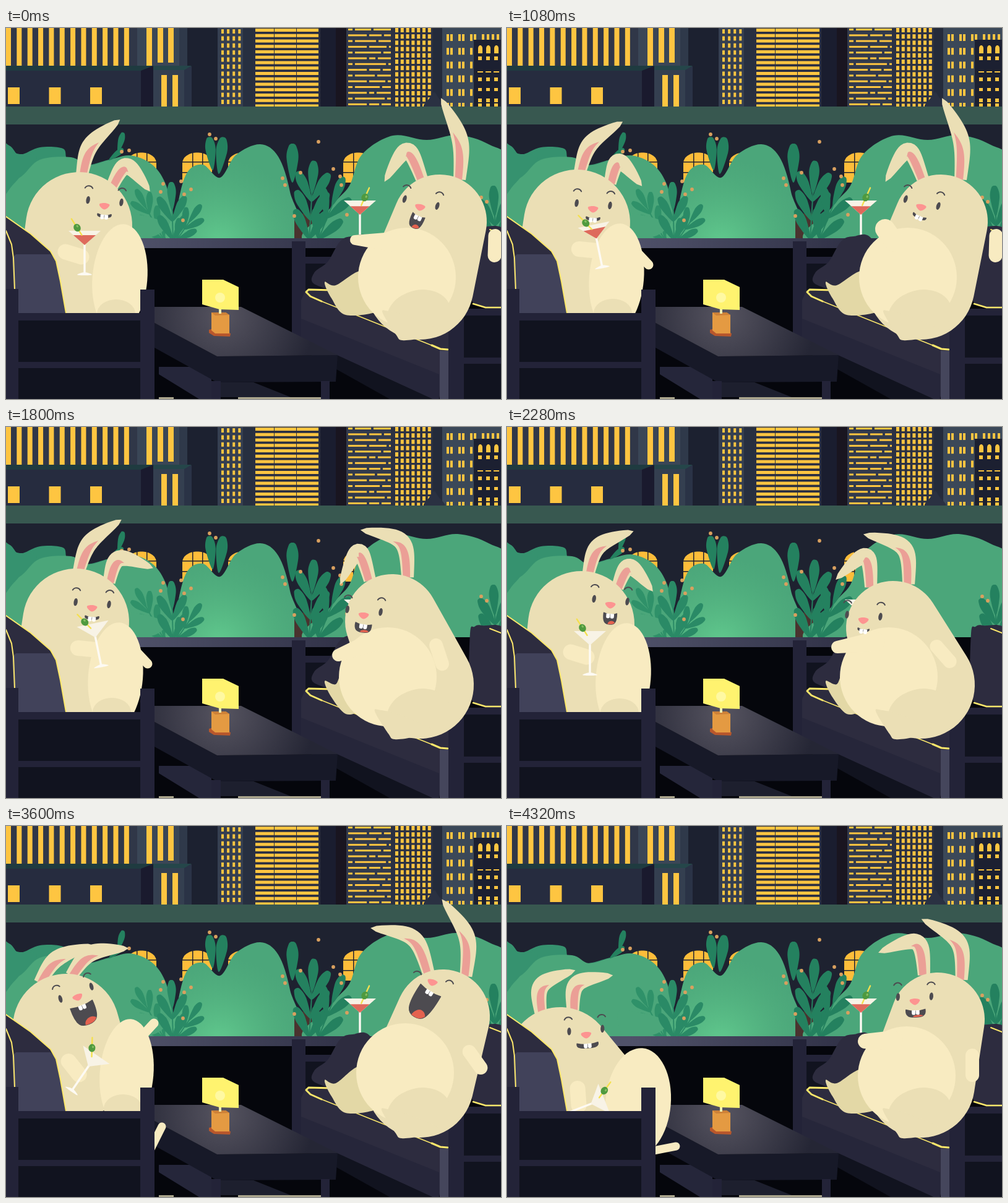
Write an HTML page with a canvas that moves like this. It is 800 px wide and 600 px high and loops after 4400 ms.

```html
<!DOCTYPE html>
<html lang="en">
<head>
<meta charset="utf-8">
<title>Rooftop drinks</title>
<style>
html, body { margin: 0; width: 100%; height: 100%; overflow: hidden; background: #05060c; }
canvas { display: block; width: 800px; height: 600px; }
</style>
</head>
<body>
<canvas id="stage" width="800" height="600"></canvas>
<script>
const LOOP = 4400, STEP = 40, RAD = Math.PI / 180;
const FUR = '#ebdfb5', BELLY = '#f8ebc1', FAR = '#e3d8a6', PINK = '#eb9f96', DARK = '#4d4b50';
const GOLD = '#fec541', PIPE = '#fbe76b', WOOD = '#232338', PANEL = '#11131f', SEAT = '#2d2c3f';
const BUSH = '#4ba67a', SHADE = '#36926f', LEAF = '#24815f', NIGHT = '#1e2230';
const stage = document.getElementById('stage').getContext('2d');
let c = stage;

// ---- drawing helpers
function rect(col, x, y, w, h) { c.fillStyle = col; c.fillRect(x, y, w, h); }
function trace(p) {
  c.beginPath();
  for (let i = 0; i < p.length; i += 2) c.lineTo(p[i], p[i + 1]);
}
function poly(col, p) { trace(p); c.closePath(); c.fillStyle = col; c.fill(); }
function line(col, w, p) {
  trace(p);
  c.strokeStyle = col; c.lineWidth = w; c.lineCap = c.lineJoin = 'round';
  c.stroke();
}
function oval(col, x, y, rx, ry, a = 0) {
  c.beginPath(); c.ellipse(x, y, rx, ry, a, 0, 7); c.fillStyle = col; c.fill();
}
// closed smooth curve through the points
function blob(col, p) {
  const n = p.length / 2, at = i => [p[((i + n) % n) * 2], p[((i + n) % n) * 2 + 1]];
  c.beginPath(); c.moveTo(p[0], p[1]);
  for (let i = 0; i < n; i++) {
    const [a, b, d, e] = [at(i - 1), at(i), at(i + 1), at(i + 2)];
    c.bezierCurveTo(b[0] + (d[0] - a[0]) / 6, b[1] + (d[1] - a[1]) / 6,
      d[0] - (e[0] - b[0]) / 6, d[1] - (e[1] - b[1]) / 6, d[0], d[1]);
  }
  c.fillStyle = col; c.fill();
}
// two circles joined by their outer tangents
function hull(col, x0, y0, r0, x1, y1, r1) {
  const a = Math.atan2(y1 - y0, x1 - x0), d = Math.hypot(x1 - x0, y1 - y0);
  const b = Math.acos(Math.max(-1, Math.min(1, (r0 - r1) / (d || 1))));
  c.beginPath();
  c.arc(x0, y0, r0, a + b, a - b + 2 * Math.PI);
  c.arc(x1, y1, r1, a - b, a + b);
  c.closePath(); c.fillStyle = col; c.fill();
}
function placed(x, y, turn, draw) { c.save(); c.translate(x, y); c.rotate(turn); draw(); c.restore(); }
function fill(g, a, b) { g.addColorStop(0, a); g.addColorStop(1, b); return g; }
const fade = (x0, y0, x1, y1, a, b) => fill(c.createLinearGradient(x0, y0, x1, y1), a, b);
const glow = (x, y, r, a, b) => fill(c.createRadialGradient(x, y, 0, x, y, r), a, b);
function grid(x, y, w, h, dx, dy, nx, ny) {
  for (let i = 0; i < nx; i++) for (let j = 0; j < ny; j++) rect(GOLD, x + i * dx, y + j * dy, w, h);
}

// ---- scenery
function city() {
  rect('#1c2130', 0, 0, 800, 127);
  rect('#303748', 0, 0, 212, 62);
  rect('#3a4656', 212, 0, 68, 62);
  rect('#2f394a', 280, 0, 13, 62);
  grid(0, 0, 8, 61, 17.35, 1, 12, 1);
  rect(GOLD, 227, 0, 9, 61);
  grid(245, 0, 9, 56, 17, 1, 2, 1);
  rect('#262c3f', 0, 69, 218, 58);
  poly('#1a1a2e', [218, 69, 238, 61, 238, 127, 218, 127]);
  poly('#1f3b40', [0, 61, 238, 61, 218, 69, 0, 69]);
  grid(3, 96, 19, 27, 66.5, 1, 3, 1);
  rect('#343f50', 238, 66, 50, 61);
  rect('#2a3346', 288, 62, 12, 65);
  poly('#25464a', [238, 61, 300, 61, 288, 68, 238, 68]);
  grid(251, 76, 9, 51, 18, 1, 2, 1);
  rect('#353f51', 342, 0, 41, 127);
  rect('#272f40', 383, 0, 17, 127);
  grid(348, 2, 4, 7, 9.1, 11.4, 4, 11);
  rect('#2a2f42', 400, 0, 108, 127);
  grid(403, 1, 30, 5, 36, 8.75, 1, 15);
  grid(434, 1, 35, 5, 36, 8.75, 2, 15);
  rect('#1a1d2f', 508, 0, 25, 127);
  rect('#191520', 533, 0, 17, 127);
  rect('#323a4c', 550, 0, 72, 127);
  for (let i = 0; i < 14; i++) {
    rect(GOLD, 553, 1 + i * 9.3, 69, 3);
    rect('#323a4c', 560 + i * 23 % 46, i * 9.3, 4, 5);
    rect('#323a4c', 590 + i * 17 % 26, i * 9.3, 4, 5);
  }
  rect('#2b3143', 622, 0, 68, 127);
  grid(629, 0, 5, 7, 8.8, 10.2, 7, 13);
  rect('#242b3b', 690, 0, 15, 127);
  rect('#3b4858', 705, 0, 95, 127);
  for (let x = 712; x < 760; x += 19) grid(x, 10, 4, 11, 6, 22.2, 2, 6);
  grid(769, 10, 4, 9, 8, 1, 4, 1);
  rect('#1c2031', 756, 19, 44, 108);
  for (let x = 763; x < 800; x += 13) {
    oval(GOLD, x + 3.5, 33, 3.5, 5);
    rect(GOLD, x, 33, 7, 8);
    rect(GOLD, x - 1, 70, 9, 2);
    grid(x, 46, 6, 6, 1, 34, 1, 3);
    grid(x, 97, 6, 5, 1, 25, 1, 2);
  }
  blob('#2a3142', [676, 128, 684, 114, 692, 104, 699, 113, 709, 128]);
  rect('#385850', 0, 127, 800, 29);
}
function arch(x) {
  c.beginPath();
  c.moveTo(x - 24, 250); c.lineTo(x - 24, 218);
  c.bezierCurveTo(x - 22, 196, x + 22, 196, x + 24, 218);
  c.lineTo(x + 24, 250); c.fillStyle = '#febd3a'; c.fill();
  for (const d of [-8, 8]) rect(NIGHT, x + d, 201, 1.5, 50);
  for (const y of [216, 233]) rect(NIGHT, x - 24, y, 49, 1.5);
}
function leaf(x, y, len, a, col = LEAF) {
  placed(x, y, a, () => blob(col, [0, 0, -len * .15, -len * .6, -len * .1, -len * .93, 0, -len, len * .1, -len * .93, len * .15, -len * .6]));
}
// a stem with pairs of leaves and one at the tip
function sprig(x, y, len, a, pairs, size, col) {
  const dx = Math.sin(a) * len, dy = -Math.cos(a) * len;
  line(col, 2, [x, y, x + dx, y + dy]);
  for (let i = 0; i < pairs; i++) {
    const k = i / pairs;
    for (const side of [-.5, .5]) leaf(x + dx * k, y + dy * k, size, a + side, col);
  }
  leaf(x + dx * .8, y + dy * .8, size, a, col);
}
function garden() {
  rect(NIGHT, 0, 156, 800, 186);
  [219, 309, 383, 569, 814].forEach(arch);
  blob(SHADE, [-20, 345, -30, 180, 5, 190, 22, 205, 55, 193, 92, 195, 100, 213, 130, 222, 190, 210, 235, 235, 250, 345]);
  blob(BUSH, [-20, 345, -15, 268, 25, 240, 55, 213, 105, 209, 132, 222, 165, 214, 200, 206, 235, 220, 257, 250, 270, 300, 274, 345]);
  blob(SHADE, [-5, 205, 22, 204, 50, 208, 30, 232, 10, 255, -5, 268]);
  leaf(166, 214, 30, .9); leaf(181, 202, 34, .25);
  sprig(256, 345, 75, -.5, 3, 36, '#2f9169');
  blob(BUSH, [180, 300, 215, 302, 250, 312, 256, 325, 235, 338, 190, 342]);
  leaf(334, 230, 54, -.1); leaf(344, 236, 60, .12);
  const mound = [271, 350, 277, 290, 292, 235, 318, 221, 346, 242, 372, 205, 411, 188, 440, 208, 459, 265, 468, 350];
  blob(BUSH, mound);
  blob(glow(345, 350, 140, 'rgba(112,226,156,.6)', 'rgba(90,190,130,0)'), mound);
  sprig(270, 343, 60, -.03, 2, 46, '#2a8a66');
  sprig(276, 343, 42, .6, 2, 36, '#2a8a66');
  rect('#4a332f', 466, 300, 42, 42);
  blob(BUSH, [495, 350, 525, 290, 555, 255, 575, 205, 625, 174, 680, 181, 730, 173, 780, 188, 815, 220, 815, 350]);
  leaf(463, 250, 63, 0);
  sprig(490, 342, 92, .06, 3, 54, LEAF);
  sprig(505, 342, 74, .38, 2, 50, LEAF);
  sprig(792, 345, 50, -.05, 2, 50, LEAF);
  const dots = [329, 172, 339, 179, 187, 200, 199, 198, 254, 252, 250, 265, 283, 248, 299, 261, 288, 269, 286, 311,
    447, 243, 451, 254, 476, 234, 505, 184, 529, 228, 540, 240, 542, 254, 466, 304, 551, 302, 768, 274, 777, 281];
  for (let i = 0; i < dots.length; i += 2) oval('#d9a05f', dots[i], dots[i + 1], 2.9, 2.9);
}
function terrace() {
  rect('#05060c', 0, 340, 800, 260);
  rect(fade(195, 0, 600, 0, '#50526a', '#2c2d42'), 100, 340, 500, 16);
  // far bench
  rect(PANEL, 484, 381, 70, 45);
  rect(WOOD, 484, 370, 60, 11);
  blob(SEAT, [500, 415, 498, 396, 520, 378, 540, 345, 560, 337, 590, 342, 620, 425, 560, 430]);
  rect(WOOD, 462, 345, 22, 160);
  poly(PANEL, [477, 490, 700, 590, 700, 600, 620, 600, 477, 520]);
  poly(SEAT, [484, 424, 560, 424, 716, 470, 716, 521, 700, 600, 690, 600, 477, 502, 477, 440]);
  poly('#26263a', [477, 470, 700, 560, 700, 600, 690, 600, 477, 502]);
  line(PIPE, 3, [528, 424, 489, 423, 485, 427, 492, 434, 510, 442]);
  line(PIPE, 1.5, [510, 442, 560, 462, 625, 488, 700, 518]);
  line(PIPE, 3, [688, 513, 702, 519, 714, 520]);
  rect('#45465c', 701, 522, 14, 78);
  blob(SEAT, [750, 334, 757, 323, 770, 321, 810, 334, 815, 452, 770, 452, 750, 430]);
  line(PIPE, 2, [782, 326, 800, 333]);
  line(PIPE, 2.5, [755, 446, 775, 452, 800, 452]);
  rect(PANEL, 740, 460, 60, 140);
  rect(WOOD, 715, 453, 25, 147);
  rect(WOOD, 740, 454, 60, 11);
  rect(WOOD, 740, 533, 60, 10);
  // table
  rect('#a9a48b', 247, 597, 24, 3);
  rect('#a9a48b', 375, 597, 134, 3);
  poly('#25263a', [247, 548, 300, 548, 332, 564, 332, 600, 312, 600, 247, 560]);
  poly('#1d1f2e', [347, 573, 400, 573, 460, 597, 347, 597]);
  poly('#171928', [240, 477, 341, 531, 536, 529, 533, 572, 341, 573, 240, 517]);
  poly(glow(350, 465, 150, '#565460', '#252635'), [240, 451, 380, 451, 536, 529, 341, 531, 240, 477]);
  rect(WOOD, 332, 571, 15, 29);
  rect(WOOD, 509, 571, 14, 29);
  // lamp
  poly('#b8572c', [328, 488, 340, 485, 363, 494, 362, 499, 336, 498, 328, 493]);
  poly('#e49a42', [332, 460, 355, 460, 361, 464, 361, 494, 338, 494, 332, 489]);
  poly('#cd8138', [332, 460, 338, 465, 361, 464, 355, 460]);
  rect('#eeeeb0', 344, 444, 4, 18);
  poly('#fff36f', [317, 407, 351, 407, 376, 419, 376, 456, 345, 455, 317, 447]);
  oval('#fff9a2', 346, 436, 8, 8);
}
function frontBench() {
  const edge = [0, 305, 40, 333, 72, 361, 81, 377, 88, 410, 97, 461];
  poly(SEAT, [...edge, 0, 461]);
  poly('#41425a', [10, 372, 16, 366, 72, 366, 80, 374, 97, 461, 14, 461]);
  line(PIPE, 2, edge);
  line(PIPE, 2, [0, 328, 9, 350, 12, 372, 14, 422]);
  rect(PANEL, 20, 473, 197, 127);
  rect(WOOD, 0, 422, 20, 178);
  rect(WOOD, 20, 461, 197, 12);
  rect(WOOD, 20, 540, 197, 10);
  rect(WOOD, 217, 423, 23, 177);
}

// ---- poses: each one states only what changes
// ears: degrees of lower and upper half, for both; nose: x, y, tilt; mouth: width, opening
const sit = {
  head: [118, 319], lean: 0, ears: [-80, -37, -64, 53], nose: [159, 288, .07], mouth: [22, 5],
  belly: [184, 405], cup: [127, 328, 0], paw: [205, 380], toe: [215, 490]
};
const sip = {
  ...sit, head: [113, 315], ears: [-76, -30, -77, 52], nose: [139, 293, .07],
  belly: [177, 404], cup: [140, 318, -.2], paw: [229, 383]
};
const drain = { ...sip, ears: [-75, -32, -78, 22] };
const chat = {
  ...sit, head: [120, 319], lean: .08, ears: [-78, -18, -70, 52], nose: [167, 288, .08], mouth: [21, 18],
  belly: [188, 405], cup: [134, 330, 0]
};
const giggle = {
  ...sit, head: [118, 322], lean: -.25, ears: [-67, -24, -57, 32], nose: [155, 287, -.17], mouth: [38, 24],
  belly: [194, 403], cup: [139, 343, .2], paw: [239, 336], toe: [238, 483]
};
const roar = {
  ...giggle, head: [97, 325], lean: -.6, ears: [-61, -16, -57, -3], nose: [116, 277, -.38], mouth: [38, 34],
  belly: [195, 400], cup: [146, 370, .6], paw: [239, 319], toe: [252, 486]
};
const slump = {
  ...roar, head: [86, 379], lean: -.45, ears: [-98, -18, -91, -7], nose: [128, 338, -.08], mouth: [34, 8],
  belly: [212, 447], cup: [157, 441, 1.2], paw: [205, 410], toe: [273, 518]
};
const point = {
  head: [701, 313], lean: 0, ears: [-110, -240, -85, -118], nose: [669, 290, .21], mouth: [21, 22], shut: 0,
  belly: [648, 403], hand: [564, 343, 8], paw: [790, 352, 1.6]
};
const rest = { ...point, mouth: [22, 5], hand: [611, 325, 16] };
const bend = {
  ...point, head: [624, 314], lean: -.1, ears: [-105, -246, -91, -171], nose: [578, 305, .08], mouth: [26, 14],
  belly: [617, 404], hand: [537, 369, 10], paw: [700, 368, 1.25]
};
const wave = {
  ...bend, head: [624, 325], ears: [-92, -224, -89, -168], nose: [576, 313, .06], mouth: [18, 4],
  hand: [534, 356, 10], paw: [705, 367, .85]
};
const shout = {
  ...bend, head: [648, 290], ears: [-96, -218, -86, -169], nose: [611, 272, 0], mouth: [57, 20],
  belly: [618, 398], hand: [563, 346, 12], paw: [680, 355, -.75]
};
const laugh = {
  ...point, head: [706, 308], lean: .08, ears: [-106, -173, -83, -128], nose: [689, 253, .28], mouth: [38, 50], shut: 1,
  belly: [645, 399], hand: [625, 360, 9], paw: [758, 378, .95]
};
const calm = {
  ...point, head: [696, 313], lean: .1, ears: [-93, -202, -87, -154], nose: [659, 284, -.02], mouth: [31, 12],
  belly: [646, 404], hand: [579, 348, 12], paw: [752, 387, 1.57]
};
// pose, time it is reached, time it is left
const leftPlan = [[sit, 0, 480], [sip, 960, 1240], [drain, 1720, 1840], [chat, 2200, 2860],
  [giggle, 3060, 3160], [roar, 3480, 3680], [slump, 4200, LOOP]];
const rightPlan = [[point, 0, 560], [rest, 920, 1280], [bend, 1700, 1840], [wave, 2200, 2380],
  [shout, 2760, 3080], [laugh, 3440, 3760], [calm, 4280, LOOP]];

function poseAt(plan, t) {
  const i = plan.findLastIndex(row => row[1] <= t), [a, , leave] = plan[i];
  const [b, reach] = plan[i + 1] || [a, LOOP + 1];
  const u = Math.max(0, (t - leave) / (reach - leave)), k = u * u * (3 - 2 * u);
  const mix = (v, w) => Array.isArray(v) ? v.map((n, j) => mix(n, w[j])) : v + (w - v) * k;
  return Object.fromEntries(Object.keys(a).map(key => [key, mix(a[key], b[key])]));
}

// ---- rabbit parts
// pull gives the fold of the ear, side the half that shows its inside
function ear(x0, y0, low, high, len0, len1, side) {
  const bx = x0 + Math.cos(low * RAD) * len0, by = y0 + Math.sin(low * RAD) * len0;
  const x1 = bx + Math.cos(high * RAD) * len1, y1 = by + Math.sin(high * RAD) * len1;
  const at = (s, f) => {
    const r = 1 - s, k0 = r ** 3, k1 = s ** 3, kb = 3 * r * s;
    const dx = r * r * (bx - x0) + s * s * (x1 - bx), dy = r * r * (by - y0) + s * s * (y1 - by), d = Math.hypot(dx, dy);
    const w = f * (10 + 3.5 * Math.sin(Math.PI * s)) * Math.sqrt(1 - s ** 5);
    return [k0 * x0 + kb * bx + k1 * x1 - dy / d * w, k0 * y0 + kb * by + k1 * y1 + dx / d * w];
  };
  const band = (col, end, f, g) => {
    const p = [], q = [];
    for (let i = 0; i <= 24; i++) {
      p.push(...at(i / 24 * end, f(i / 24)));
      q.unshift(...at(i / 24 * end, g(i / 24)));
    }
    poly(col, p.concat(q));
  };
  band(FUR, 1, () => -1, () => 1);
  band(PINK, .64, u => side * (.75 - .15 * u), u => side * (-.4 + u ** 2));
}
function ears({ head: [x, y], lean, ears: e }, r, spots, len0, len1, side) {
  spots.map((spot, i) => ear(x + Math.cos(lean + spot) * r, y + Math.sin(lean + spot) * r, e[i * 2], e[i * 2 + 1], len0, len1, side));
}
function face({ nose: [x, y, tilt], mouth: [w, h], shut = 0 }, mouthTurn) {
  const brow = y => {
    c.beginPath(); c.arc(0, y, 7, 1.15 * Math.PI, 1.85 * Math.PI);
    c.strokeStyle = DARK; c.lineWidth = 2; c.lineCap = 'round'; c.stroke();
  };
  placed(x, y, tilt, () => {
    for (const ex of [-27, 27]) placed(ex, -8, 0, () => {
      if (shut > .5) brow(4); else { oval(DARK, 0, 0, 3.1, 6.3, .1); brow(-16); }
    });
    placed(1, 13, tilt * mouthTurn, () => {
      c.beginPath();
      c.moveTo(-w / 2, 0);
      c.quadraticCurveTo(0, 5, w / 2, 0);
      c.bezierCurveTo(w * .54, h * .9, w * .32, h, 0, h);
      c.bezierCurveTo(-w * .32, h, -w * .54, h * .9, -w / 2, 0);
      c.fillStyle = c.strokeStyle = DARK; c.lineWidth = 1.5; c.lineJoin = 'round';
      c.fill(); c.stroke();
      if (h > 8) {
        c.save(); c.clip();
        oval('#e4624f', w * .15, h, w * .3, h * .3);
        c.restore();
      }
      for (const tx of [-6.3, .3]) {
        c.beginPath(); c.roundRect(tx, 1, 6, 7.5, [0, 0, 2.5, 2.5]);
        c.fillStyle = '#fff'; c.fill();
      }
    });
    blob('#fd9491', [-8, -3, 0, -5, 8, -3, 6, 2, 0, 5.5, -6, 2]);
  });
}
function martini(level, ox, oy, stick) {
  line('#fdfaf3', 3.4, [0, 20, 0, 69]);
  blob('#fdfaf3', [-12, 71, 0, 67, 12, 71, 0, 72]);
  poly('#f8f3e6', [-26, 0, 26, 0, 0, 23]);
  poly('#de6a5c', [-26 * level, 23 - 23 * level, 26 * level, 23 - 23 * level, 0, 23]);
  placed(ox, oy, stick, () => {
    line('#f4e04f', 2.4, [-17, 0, 14, 0]);
    oval('#4f9a3f', 0, 0, 6.5, 5.5);
    oval('#86bd62', -2, -1.5, 2, 1.6);
  });
}
function drawLeft(t) {
  const p = poseAt(leftPlan, t), [bx, by] = p.belly;
  const level = .7 * Math.max(0, Math.min(1, (1700 - t) / 600));
  ears(p, 83, [-1.51, -.87], 49, 66, 1);
  line(BELLY, 15, [bx + 20, by - 55, ...p.paw]);
  line(BELLY, 13, [232, 526, ...p.toe]);
  hull(FUR, ...p.head, 86, bx - 78, by - 13, 84);
  oval(BELLY, bx, by, 44 + (by - 403) / 5, 88, .08);
  oval(FUR, bx - 6, by + 57, 31, 23);
  face(p, 0);
  placed(...p.cup, () => {
    line(BELLY, 25, [-31, 34, -5, 42]);
    martini(level, -12, -5, 1);
  });
}
function drawRight(t) {
  const p = poseAt(rightPlan, t), [bx, by] = p.belly, [hx, hy, hr] = p.hand;
  const hip = [669, 417], shift = (bx - 617) * .4;
  if (t < 640) p.mouth[1] *= .65 + .35 * Math.cos(t / 160 * Math.PI);
  blob(FAR, [515, 411, 533, 416, bx - 70, by - 10, bx - 40, 440, bx - 45, 458, 549, 464, 526, 437]);
  ears(p, 75, [-1.97, -1.13], 65, 76, -1);
  hull(FUR, ...p.head, 76, ...hip, 87);
  oval(BELLY, bx, by, 79, 80);
  oval(FUR, hip[0] - 2, hip[1] + 46, 52, 39, -.25);
  placed(shift, 0, 0, () => blob(FUR, [596, 460, 606, 458, 635, 465, 690, 490, 660, 501, 628, 505, 618, 496]));
  hull(BELLY, bx - 22, by - 57, 16, hx, hy, hr);
  placed(...p.paw, () => line(BELLY, 22, [-16, 0, 16, 0]));
  face(p, 1);
}

// ---- static layer and loop
const back = document.createElement('canvas');
back.width = 800; back.height = 600;
c = back.getContext('2d');
city();
garden();
placed(572, 279, 0, () => martini(.6, 8, -5, 2));
terrace();
c = stage;

const start = performance.now();
function frame() {
  const t = Math.floor((performance.now() - start) % LOOP / STEP) * STEP;
  c.drawImage(back, 0, 0);
  drawRight(t);
  drawLeft(t);
  frontBench();
  requestAnimationFrame(frame);
}
frame();
</script>
</body>
</html>
```
